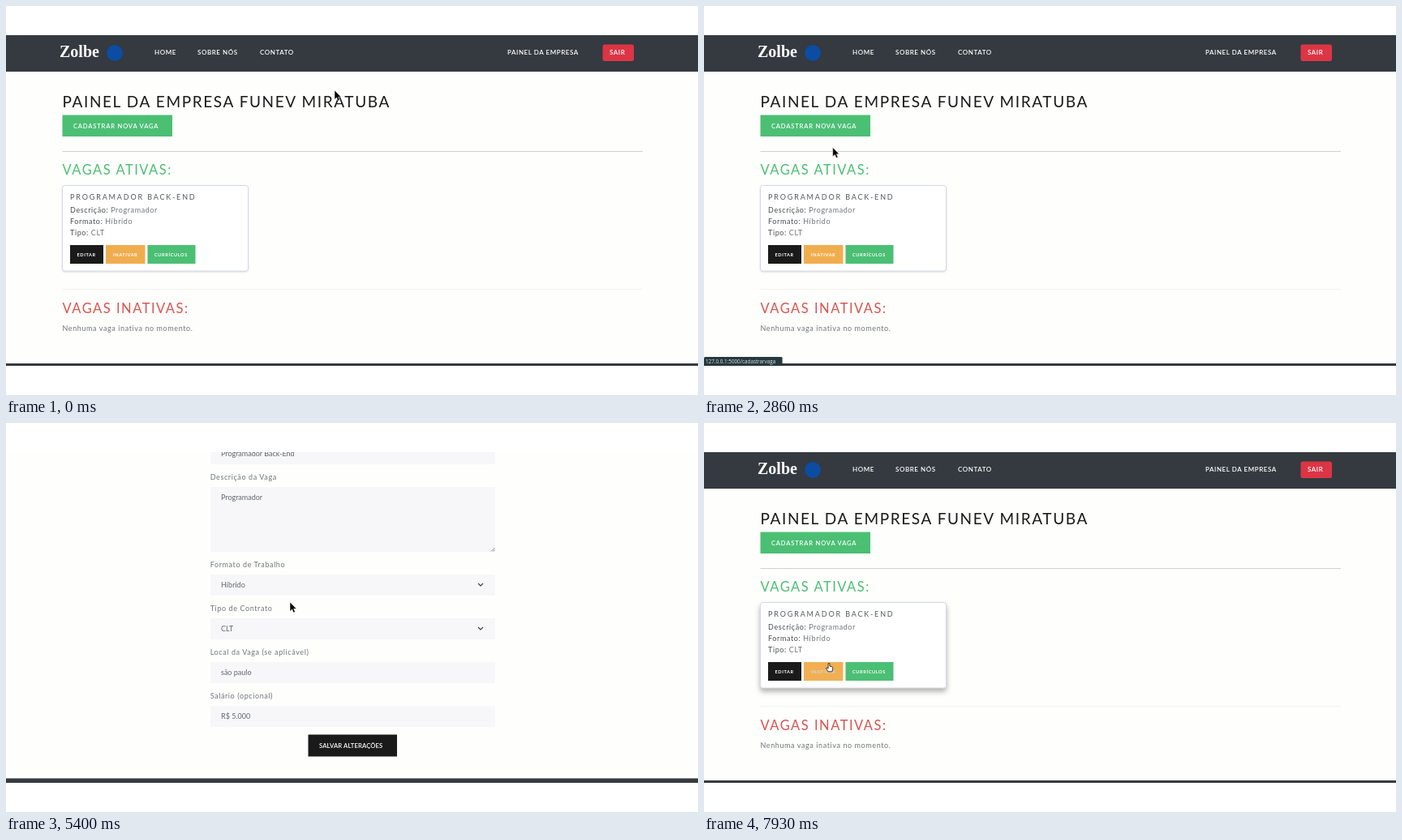
Recreate the animation shown at these times as an HTML page. Size 853 px wide and 480 px high, loop 8 s.

```html
<!DOCTYPE html>
<html lang="pt-BR">
<head>
<meta charset="utf-8">
<title>Painel da empresa</title>
<style>
  html, body { margin: 0; width: 100%; height: 100%; overflow: hidden; background: #fff; }
  svg { display: block; width: 853px; height: 480px; }
  text { font-family: Lato, "Open Sans", sans-serif; white-space: pre; }
  .nav { font-size: 8px; font-weight: 600; letter-spacing: .55px; fill: #fff; }
  .h1 { font-size: 19px; letter-spacing: 1.6px; fill: #1a1a1a; }
  .h2 { font-size: 16.5px; letter-spacing: 1.5px; }
  .h3 { font-size: 9px; letter-spacing: 1.85px; fill: #55595c; }
  .body { font-size: 9px; letter-spacing: .6px; fill: #6f7478; }
  .body tspan { fill: #4a4e51; }
  .field { font-size: 9px; fill: #62676b; }
  .btn { font-size: 7.6px; font-weight: 600; letter-spacing: .8px; fill: #fff; }
  .small { font-size: 5.6px; font-weight: 700; letter-spacing: .6px; fill: #fff; }
  .save { font-size: 7.7px; font-weight: 600; letter-spacing: .1px; fill: #fff; }
  .brand { font: bold 20px "Liberation Serif", serif; fill: #fff; }
  .status { font: 6.3px "Open Sans", sans-serif; fill: #dfe5e6; }
</style>
</head>
<body>
<svg id="stage" viewBox="0 0 853 480"></svg>
<script>
const GREEN = '#4bbf73', RED = '#d9534f', DARK = '#343a40', INK = '#1a1a1a';
const LOOP = 8000, EDIT_AT = 4400, BACK_AT = 6700;

const text = (cls, x, y, str, extra = '') => `<text class="${cls}" x="${x}" y="${y}" ${extra}>${str}</text>`;
const rect = (x, y, w, h, fill, extra = '') =>
  `<rect x="${x}" y="${y}" width="${w}" height="${h}" fill="${fill}" ${extra}/>`;

const navbar = rect(0, 36, 853, 45, DARK)
  + text('brand', 66, 63, 'Zolbe')
  + '<circle cx="134" cy="58" r="10" fill="#0c4ca3"/>'
  + text('nav', 183, 60.4, 'HOME') + text('nav', 236, 60.4, 'SOBRE NÓS')
  + text('nav', 313, 60.4, 'CONTATO') + text('nav', 618, 60.4, 'PAINEL DA EMPRESA')
  + rect(735.5, 47.5, 38.5, 20.5, '#dc3545', 'rx="2.5"') + text('nav', 744, 60.4, 'SAIR');

const panel = text('h1', 69.5, 125, 'PAINEL DA EMPRESA FUNEV MIRATUBA')
  + rect(69.5, 134.5, 135.5, 26.5, GREEN, 'id="newBox"')
  + text('btn', 83, 150.5, 'CADASTRAR NOVA VAGA', 'id="newText"')
  + rect(69.5, 179, 715.5, 1, '#cdd0d6')
  + text('h2', 69.5, 208, 'VAGAS ATIVAS:', `fill="${GREEN}"`)
  + rect(69.5, 221.5, 229, 105.5, '#fff', 'id="card" rx="3" stroke="#d3d9e2"')
  + text('h3', 79, 239, 'PROGRAMADOR BACK-END')
  + [['Descrição:', 'Programador'], ['Formato:', 'Híbrido'], ['Tipo:', 'CLT']]
    .map(([k, v], i) => text('body', 79, 255.3 + i * 13.6, `<tspan>${k}</tspan> ${v}`)).join('')
  + rect(79, 295, 41, 23, INK) + text('small', 87.5, 308.6, 'EDITAR')
  + rect(123, 295, 48.5, 23, '#f0ad4e', 'id="offBox"') + text('small', 132, 308.6, 'INATIVAR', 'id="offText"')
  + rect(174.5, 295, 59, 23, GREEN) + text('small', 183, 308.6, 'CURRÍCULOS')
  + rect(69.5, 349, 715.5, 1, '#f1f1f2')
  + text('h2', 69.5, 378.6, 'VAGAS INATIVAS:', `fill="${RED}"`)
  + text('body', 69.5, 401.3, 'Nenhuma vaga inativa no momento.')
  + rect(0, 441, 853, 3, DARK);

const fields = [
  // label, value, top, height, select
  ['Título da Vaga', 'Programador Back-End', 153, 26],
  ['Descrição da Vaga', 'Programador', 207, 80],
  ['Formato de Trabalho', 'Híbrido', 315, 26, true],
  ['Tipo de Contrato', 'CLT', 369, 26, true],
  ['Local da Vaga (se aplicável)', 'são paulo', 423, 26],
  ['Salário (opcional)', 'R$ 5.000', 477, 26],
];
const form = text('h1', 251.5, 125, 'EDITAR VAGA')
  + fields.map(([label, value, y, h, select]) =>
    text('body', 251.7, y - 9, label) + rect(252, y, 351, h, '#f7f7f9') + text('field', 265, y + 15.8, value)
    + (select ? `<path d="M582 ${y + 11}l3 3 3-3" fill="none" stroke="#343a40" stroke-width="1.1"/>` : '')).join('')
  + '<path d="M598 286.5l4.500-4.500M600.500 286.500l2-2" stroke="#555" stroke-width=".7"/>'
  + rect(372.5, 512.5, 109.500, 27, INK) + text('save', 386, 528.7, 'SALVAR ALTERAÇÕES')
  + rect(0, 566.5, 853, 8, DARK);

const cursors = `
  <path id="arrow" d="M0 0V11.300L2.600 9 4.400 13 6.400 12.100 4.700 8.300H8Z" fill="#0c0408" stroke="#fff" stroke-width=".5"/>
  <path id="hand" d="M-.9 .8Q0-.6 .9 .8V4L4 4.800Q5 5.200 4.800 6.500L4 10.800H-1L-3.300 7Q-3.600 5.700-2.300 5.900L-.9 7Z"
    fill="#fff" stroke="#111" stroke-width=".8"/>
  <path id="beam" d="M-1.800-3.500H1.800M-1.800 3.500H1.800M0-3.500V3.500" fill="none" stroke="#444" stroke-width=".8"/>`;

const $ = id => document.getElementById(id);
$('stage').innerHTML = `<clipPath id="view"><rect y="36" width="853" height="408"/></clipPath>
  <g clip-path="url(#view)">${rect(0, 36, 853, 408, '#fefefd')}
    <g id="page">${navbar}<g id="panel">${panel}</g><g id="form">${form}</g></g>
    <g id="status"><rect id="bubble" y="433" height="11" rx="1.500" fill="#26393e"/>${text('status', 2, 440.800, '', 'id="url"')}</g>
    ${cursors}
  </g>`;

// Pointer hot spot: time, x, y
const path = [
  [0, 405, 104], [200, 405, 104], [900, 330, 124], [1850, 188, 146], [2550, 188, 146],
  [2900, 155, 178], [3120, 225, 270], [3300, 142, 303], [3460, 132, 308], [3560, 121, 312],
  [3700, 110, 308], [4300, 110, 308], [4570, 337, 225], [4850, 340, 225], [5400, 350, 221],
  [5650, 350, 221], [5950, 324, 188], [6500, 653, 51], [6950, 653, 51], [7350, 491, 150],
  [7640, 225, 270], [7900, 157, 295], [7930, 154, 296], [8000, 154, 296],
];
// Page offset: time, y
const scroll = [[0, 0], [4850, 0], [5350, 128], [5600, 128], [6050, 0], [8000, 0]];

const clamp = v => Math.max(0, Math.min(1, v));
function at(keys, t) {
  const i = Math.max(1, keys.findIndex(k => k[0] >= t));
  const a = keys[i - 1], b = keys[i], p = clamp((t - a[0]) / (b[0] - a[0]));
  return a.slice(1).map((v, n) => v + (b[n + 1] - v) * p);
}

const onForm = t => t >= EDIT_AT && t < BACK_AT;
const spots = {
  create: [69.5, 134.5, 205, 161, '127.0.0.1:5000/cadastrarvaga'],
  edit: [79, 295, 120, 318, '127.0.0.1:5000/editarvaga/1'],
  off: [123, 295, 171.5, 318],
  card: [69.5, 221.5, 298.5, 327],
  home: [612, 46, 713, 70, '127.0.0.1:5000/empresa'],
};
function inside(name, t) {
  if (t < 0 || (onForm(t) && name !== 'home')) return false;
  const [x, y] = at(path, t), [l, top, r, b] = spots[name];
  return x >= l && x <= r && y >= top && y <= b;
}
// Share of the last ms spent over a spot: a linear hover transition
function hover(name, t, ms) {
  let n = 0;
  for (let i = 0; i < 12; i++) n += inside(name, t - ms * (i + .5) / 12);
  return n / 12;
}
const mix = (a, b, p) => `rgb(${a.map((v, i) => Math.round(v + (b[i] - v) * p))})`;
const show = (id, on) => { $(id).style.display = on ? '' : 'none'; };

function tint(id, p, from, to) {
  $(id + 'Box').style.fill = mix(from, to, p);
  $(id + 'Text').style.fill = mix([255, 255, 255], [20, 20, 20], p);
}

function pointer(t, x, y, dy) {
  if (['create', 'edit', 'off', 'home'].some(n => inside(n, t))) return 'hand';
  const typing = onForm(t) && x > 252 && x < 603
    && fields.some(([, , top, h, select]) => !select && y + dy > top && y + dy < top + h);
  return typing ? 'beam' : 'arrow';
}

function render(t) {
  const [x, y] = at(path, t), [dy] = at(scroll, t);
  show('panel', !onForm(t));
  show('form', onForm(t));
  $('page').setAttribute('transform', `translate(0 ${-dy})`);

  tint('new', hover('create', t, 150), [75, 191, 115], [64, 162, 98]);
  tint('off', hover('off', t, 150), [240, 173, 78], [243, 187, 106]);
  const lift = hover('card', t, 250);
  $('card').style.filter = `drop-shadow(0 ${1 + 3 * lift}px ${1.2 + 2 * lift}px rgba(0,0,0,${.12 + .18 * lift}))`;

  let best = 0;
  for (const name of ['create', 'edit', 'home']) {
    const p = hover(name, t - 230, 150);
    if (p <= best) continue;
    best = p;
    const url = spots[name][4];
    $('url').textContent = url;
    $('bubble').setAttribute('width', 7 + 3.2 * url.length);
  }
  $('status').style.opacity = best;

  const kind = pointer(t, x, y, dy);
  for (const id of ['arrow', 'hand', 'beam']) show(id, id === kind);
  $(kind).setAttribute('transform', `translate(${x} ${y})`);
}

const start = performance.now();
function tick() {
  render((performance.now() - start) % LOOP);
  requestAnimationFrame(tick);
}
tick();
</script>
</body>
</html>
```
